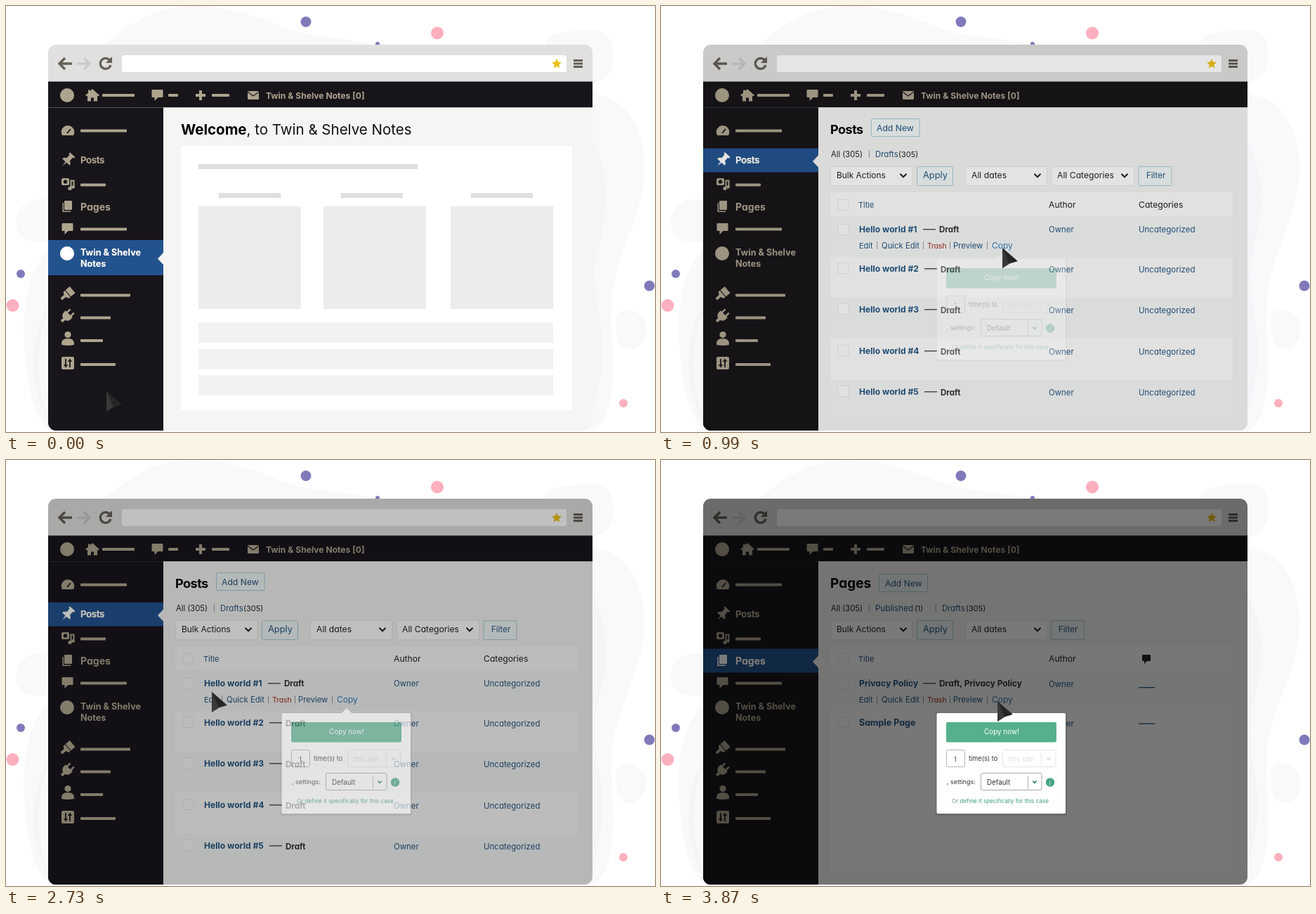
Write an HTML page that moves like this. It is 924 by 606 pixels and loops after 5.08 s.

```html
<!DOCTYPE html>
<html lang="en">
<head>
<meta charset="utf-8">
<title>Copying posts and pages</title>
<style>
  html, body { margin: 0; width: 100%; height: 100%; overflow: hidden; background: #fff; }
  svg { display: block; width: 100vw; height: 100vh; }
  text { font-family: Inter, Lato, sans-serif; font-feature-settings: "cv11"; white-space: pre; }
  #popup text { font-feature-settings: normal; }
</style>
</head>
<body>
<svg id="stage" viewBox="0 0 924 606" xmlns="http://www.w3.org/2000/svg"></svg>
<script>
const LOOP = 5080;
const INK = '#18151a', TAN = '#aea48e', LINK = '#24557f', BLUE = '#23538f', GREEN = '#57b08c';
const PRODUCT = ['Twin & Shelve', 'Notes'], USER = 'Owner';

// Drawing helpers, all return SVG markup
const esc = s => s.replace(/&/g, '&amp;');
const rect = (x, y, w, h, fill, more = '') =>
  `<rect x="${x}" y="${y}" width="${w}" height="${h}" fill="${fill}" ${more}/>`;
const circle = (x, y, r, fill) => `<circle cx="${x}" cy="${y}" r="${r}" fill="${fill}"/>`;
const path = (d, fill, more = '') => `<path d="${d}" fill="${fill}" ${more}/>`;
const stroke = (d, color, w, more = '') =>
  path(d, 'none', `stroke="${color}" stroke-width="${w}" ${more}`);
const text = (x, y, s, size, fill = '#222', weight = 400, space = 0) =>
  `<text x="${x}" y="${y}" font-size="${size}" fill="${fill}" font-weight="${weight}" letter-spacing="${space}">${esc(s)}</text>`;
const bold = (x, y, s, size, fill, space) => text(x, y, s, size, fill, 700, space);
const group = (id, ...parts) => `<g id="${id}">${parts.join('')}</g>`;
const place = (x, y, turn, body) => `<g transform="translate(${x} ${y}) rotate(${turn})">${body}</g>`;
const chevron = (x, y, r = 4.5, color = '#222', w = 2) =>
  stroke(`M${x - r} ${y - r / 2}l${r} ${r}l${r} ${-r}`, color, w);
const bubble = (x, y, fill) =>
  path(`M${x - 7} ${y - 8}h14q1 0 1 1v9q0 1-1 1h-6l-5 5v-5h-3q-1 0-1-1v-9q0-1 1-1z`, fill);

// Sidebar pieces
const pin = c => place(88, 219, 42,
  path('M-5-10h10v2l-2 1v6q4 2 4 5h-14q0-3 4-5v-6l-2-1zM-1 4h2l-1 7z', c));
const sheets = c => rect(83, 277, 11, 13, c, 'rx="1"') + path('M80.500 280h1.500v11.500h10v1.500h-11.500z', c);
const productItem = c => circle(87, 352, 10, c)
  + bold(106, 355, PRODUCT[0], 12.6, c) + bold(106, 371, PRODUCT[1], 12.6, c);
const postsItem = c => pin(c) + bold(106, 224, 'Posts', 13.4, c, -.5);
const pagesItem = c => sheets(c) + bold(106, 290.500, 'Pages', 14, c);

function backdrop() {
  const dots = [[427, 22.5, 7.5, 0], [529, 54, 3, 0], [21, 381, 6, 0], [916, 398, 7.5, 0],
    [614, 38.5, 9, 1], [9.5, 426, 9, 1], [879, 565, 6, 1]];
  return [
    'M120 70C175 25 210 0 268 0C350 0 385 35 440 42C500 48 540 55 560 75z',
    'M62 276C40 270 14 282 14 308C14 334 42 340 62 334z',
    'M62 345C35 370 22 420 26 480C29 540 40 585 62 604z',
    'M768 55C768 38 790 37 815 35C850 30 865 40 865 70C865 95 855 104 834 110z',
    'M834 125C880 130 906 165 909 225C911 300 865 350 862 425C861 470 870 520 860 560C855 585 848 598 834 606z',
    'M868 445C870 428 895 430 905 442C918 456 910 486 890 488C868 488 869 465 868 445z',
  ].map(d => path(d, '#f9f9fb')).join('')
    + stroke('M61 430C38 470 36 540 61 590', '#f5f5f8', 6)
    + path('M834 190C862 240 858 290 842 350C828 410 860 460 846 530C842 555 838 570 834 580z', '#f5f5f8')
    + dots.map(([x, y, r, pink]) => circle(x, y, r, pink ? '#fcb0bd' : '#807abb')).join('');
}

const frame = () => rect(60, 55, 775, 80, '#e0e0de', 'rx="11"')
  + rect(165, 70, 633, 24, '#fff', 'rx="3"') + rect(60, 107.500, 775, 37, INK);

// Page ground with sidebar; the active row spans y to y + h
const ground = (fill, y, h) => rect(60, 144.500, 164, 460, INK) + rect(224, 144.500, 611, 460, fill)
  + rect(60, y, 164, h, BLUE) + path(`M224 ${y + h / 2 - 7}l-8 8.500l8 8.500z`, fill);

const button = (x, y, w, h = 28) =>
  rect(x + .5, y + .5, w - 1, h - 1, '#eff6f6', 'stroke="#a9cbd6" rx="1"');
const select = (x, w) => rect(x + .5, 228.500, w - 1, 27, '#fdfdfd', 'stroke="#e9e9e9"');
const check = y => rect(252, y - 7.500, 15, 15, '#fafafa', 'stroke="#e6e8e8"');

function welcomeBack() {
  const card = [274, 452, 633];
  return ground('#f5f5f3', 333, 50) + rect(249, 199, 557, 376, '#fff')
    + rect(274, 225, 312, 7, '#dfdfdf')
    + [303, 477, 662].map(x => rect(x, 266, 88, 7, '#dfdfdf')).join('')
    + card.map(x => rect(x, 285, 146, 146, '#ececec')).join('')
    + [450, 488, 525].map(y => rect(274, y, 505, 29, '#f2f2f2')).join('');
}

function tableBack(rows) {
  return rect(241, 265, 573, 322, '#fafafa') + check(282.500)
    + rows.map(([y, h], i) => (i % 2 ? '' : rect(241, y, 573, h, '#f3f5f5'))
      + check(i ? y + 16 : y + 19)).join('');
}

const postsBack = () => ground('#f3f3f2', 202.500, 34) + button(299, 160, 69.500, 26)
  + select(241, 117) + button(364, 228, 52) + select(433, 117) + select(556, 118)
  + button(679.500, 228, 48)
  + tableBack([[299, 58], [357, 57], [415, 58], [474, 58], [532, 55]]);

const pagesBack = () => ground('#f3f3f2', 268.500, 34) + button(310, 162, 70, 26)
  + select(241, 117) + button(364, 228, 52) + select(433, 117) + button(555, 228, 48)
  + tableBack([[299, 58], [357, 230]]);

function frameFront() {
  const bars = [[137, 127, 46], [231, 127, 14], [293, 127, 25], [106, 177.500, 66], [106, 254.500, 36],
    [106, 317.500, 66], [106, 411.500, 71], [106, 443.500, 43], [106, 476, 32], [106, 510, 50]];
  const grey = '#655f56';
  return stroke('M94 82H77M84 74l-8 8l8 8', grey, 3.4)
    + stroke('M101 82h17M111 74l8 8l-8 8', '#cbcac7', 3.2)
    + stroke('M147.500 77a7.500 7.500 0 1 0 1.500 7', grey, 3.2) + path('M151 72v9h-9z', grey)
    + path('M784 75l2 4.600l5 .500l-3.700 3.300l1.100 4.900l-4.400-2.500l-4.400 2.500l1.100-4.900l-3.700-3.300l5-.500z', '#ecc218')
    + [76, 80.500, 85].map(y => rect(808, y, 13, 3, grey)).join('')
    + circle(87, 127, 10, TAN)
    + path('M123 118l10 9l-1.500 1.500l-1.500-1v8h-5v-5h-4v5h-5v-8l-1.500 1l-1.500-1.500l4-3.600v-4h3v1.500z', TAN)
    + bubble(215.500, 127, TAN) + stroke('M270 127h14M277 120v14', TAN, 4)
    + rect(344, 121, 16, 12, TAN, 'rx="1.500"') + stroke('M344.500 122.500l7.500 5.500l7.500-5.500', INK, 1.2)
    + bold(370, 132, PRODUCT.join(' ') + ' [0]', 12.1, TAN)
    + bars.map(([x, y, w]) => rect(x, y - 2, w, 4, TAN, 'rx="1"')).join('')
    + path('M80 184a9.300 9.300 0 1 1 16 0z', TAN) + stroke('M87 181l5-6', INK, 1.8)
    + rect(79, 245, 11, 10, TAN, 'rx="2"') + circle(84.500, 250, 2.700, INK)
    + stroke('M92.500 259v-10.500h4v9.500', TAN, 2) + circle(91, 259.500, 2.600, TAN) + circle(95.500, 257.500, 2.300, TAN)
    + bubble(87.500, 317, TAN)
    + place(87, 410, 50, path('M-6-10h12v8h-12zM-6-1h12v3l-4 2v6q-2 2-4 0v-6l-4-2z', TAN))
    + place(87, 441, 45, path('M-5-10h2.500v6h5v-6h2.500v6h2v3q0 6-5 7v5h-4v-5q-5-1-5-7v-3h2z', TAN))
    + circle(88, 467.500, 4.600, TAN) + path('M79 482q-1-9 9-9t9 9q-9 2-18 0z', TAN)
    + rect(79, 499, 18, 18, TAN, 'rx="2"')
    + stroke('M85 502v12M91 502v12M82.500 511h5M88.500 505h5', INK, 1.8)
    + productItem(TAN) + postsItem(TAN) + pagesItem(TAN);
}

const welcomeFront = () => productItem('#fff')
  + `<text x="249" y="183" font-size="20.500" fill="#111"><tspan font-weight="700" fill="#000">Welcome</tspan>, to ${esc(PRODUCT.join(' '))}</text>`;

const bar = (x, y) => rect(x, y, 1, 11, '#9a9a9a');
const filters = () => text(242, 214.500, 'All (305)', 11.2) + bar(296, 205)
  + text(250, 245, 'Bulk Actions', 11.9) + chevron(345, 241) + text(373, 245, 'Apply', 12.800, LINK)
  + text(442, 245, 'All dates', 12.200) + chevron(536, 241)
  + text(281, 287, 'Title', 11, LINK) + text(552, 287, 'Author', 12.200);
const actions = () => [[282, 'Edit', 11], [314, 'Quick Edit', 11.300], [416, 'Preview', 11.300]]
  .map(([x, s, size]) => text(x, 345, s, size, LINK)).join('')
  + text(379, 345, 'Trash', 10.300, '#a3260d') + text(471, 345, 'Copy', 12, '#3a7db4')
  + [307, 373, 411, 464].map(x => bar(x, 335)).join('');
const dash = (x, y) => rect(x, y, 18, 1.500, '#555');

function postsFront() {
  const rows = [322, 378, 436, 495, 553].map((y, i) => {
    const shift = i ? 1 : 0;
    return bold(282, y, 'Hello world #' + (i + 1), 12.100, LINK) + dash(373 + 2 * shift, y - 5)
      + bold(396 + 2 * shift, y + shift, 'Draft', 11.600, '#333')
      + text(552, y + shift, USER, 11.400, LINK)
      + text(680, y + shift, 'Uncategorized', 11.500, LINK);
  });
  return postsItem('#fff') + bold(241, 182, 'Posts', 18, '#000', -.5)
    + text(307, 177.500, 'Add New', 12.200, LINK)
    + filters() + text(305, 214.500, 'Drafts', 11.400, LINK) + text(338, 214.500, '(305)', 11)
    + text(564, 245, 'All Categories', 12.200) + chevron(660, 241) + text(691, 245, 'Filter', 11.500, LINK)
    + text(680, 287, 'Categories', 12.200) + rows.join('') + actions();
}

const pagesFront = () => pagesItem('#fff') + bold(241, 182, 'Pages', 19, '#000')
  + text(319, 179.500, 'Add New', 12.200, LINK) + filters()
  + text(305, 214.500, 'Published', 11.700, LINK) + text(361, 214.500, '(1)', 10.600) + bar(391, 205)
  + text(400, 214.500, 'Drafts', 11.400, LINK) + text(434, 214.500, '(305)', 11)
  + text(566, 245, 'Filter', 11.500, LINK)
  + path('M686 277h10q1 0 1 1v7q0 1-1 1h-4l-4 4v-4h-2q-1 0-1-1v-7q0-1 1-1z', '#222')
  + bold(282, 322, 'Privacy Policy', 12.200, LINK) + dash(373, 317)
  + bold(396, 322, 'Draft, Privacy Policy', 11.900, '#333')
  + bold(282, 378, 'Sample Page', 12.500, LINK)
  + text(552, 323, USER, 11.400, LINK) + text(552, 379, USER, 11.400, LINK)
  + rect(680, 323, 23, 1.300, LINK) + rect(680, 374.500, 23, 1.300, LINK) + actions();

const field = (x, y, w, edge) => rect(x + .5, y + .5, w - 1, 24, '#fff', `stroke="${edge}" rx="2"`);
const popup = () => rect(391, 359, 187, 147, '#000', 'opacity=".1" rx="3"')
  + rect(392.500, 360, 183.500, 143, '#fff', 'rx="2"') + path('M477 361l8-8l8 8z', '#fff')
  + rect(406, 373, 157, 28.500, GREEN, 'rx="2"') + text(460, 390, 'Copy now!', 9.900, '#fff')
  + field(406, 412, 27, '#b4b4b4') + text(417, 428.500, '1', 9.500, '#444')
  + text(438, 428, 'time(s) to', 9.200, '#333')
  + field(486, 412, 76.500, '#e4e4e4') + text(495, 428.500, 'this site', 9.600, '#dcdcdc')
  + rect(541, 416, 1, 18, '#e6e6e6') + chevron(551.500, 425, 2.700, '#ccc', 1.300)
  + text(407, 461, ', settings:', 8.900, '#333')
  + field(455, 445, 87.500, '#a9a9a9') + text(464, 461.500, 'Default', 9.800, '#333')
  + rect(522, 449, 1, 19, '#b5b5b5') + chevron(532, 458, 2.700, '#2e7d5f', 1.500)
  + circle(554, 458.500, 6.200, '#45a583') + `<text x="552.800" y="461.500" font-size="8" font-style="italic" fill="#fff">i</text>`
  + `<text x="414" y="488" font-size="8.150" fill="#3c9c79"><tspan fill="#6f9c8b">Or</tspan> define it specifically for this case</text>`;

const stage = document.getElementById('stage');
stage.innerHTML = `<defs><clipPath id="win">${rect(60, 55, 775, 549, '#000', 'rx="11"')}</clipPath></defs>`
  + backdrop()
  + `<g clip-path="url(#win)">`
  + frame() + welcomeBack() + group('postsBack', postsBack()) + group('pagesBack', pagesBack())
  + frameFront()
  + group('welcomeFront', welcomeFront()) + group('postsFront', postsFront()) + group('pagesFront', pagesFront())
  + rect(60, 55, 775, 549, '#000', 'id="dim"') + '</g>'
  + group('popup', popup())
  + group('cursor', path('M0 0L22 19L10 22.500L0 29z', '#272626'), path('M0 0L10 22.500L0 29z', '#3a3939'));

// Steps are [ms, value]; the last value holds to the end of the loop
function play(id, steps, toStyle, easing = 'linear') {
  const all = [...steps, [LOOP, steps[steps.length - 1][1]]];
  const keys = all.map(([ms, v]) => ({ offset: ms / LOOP, easing, ...toStyle(v) }));
  document.getElementById(id).animate(keys, { duration: LOOP, iterations: Infinity });
}
const fade = (id, steps) => play(id, steps, opacity => ({ opacity }));

// A click at ms starts a page change, then the popup opens
const rise = (ms, top, curve) => curve.map(([d, v]) => [ms + d, v * top]);
const dimCurve = [[330, 0], [360, .08], [420, .24], [540, .9], [660, .97], [780, 1]];
const popCurve = [[340, 0], [360, .03], [420, .25], [540, .32], [660, .8], [780, 1]];
const POSTS = 570, PAGES = 3090, SWAP = 150;

fade('postsBack', [[0, 0], [POSTS, 0], [POSTS + SWAP, 1]]);
fade('pagesBack', [[0, 0], [PAGES, 0], [PAGES + SWAP, 1]]);
fade('welcomeFront', [[0, 1], [POSTS, 1], [POSTS + SWAP, 0]]);
fade('postsFront', [[0, 0], [POSTS, 0], [POSTS + SWAP, 1], [PAGES, 1], [PAGES + SWAP, 0]]);
fade('pagesFront', [[0, 0], [PAGES, 0], [PAGES + SWAP, 1]]);
fade('dim', [[0, 0], ...rise(POSTS, .41, dimCurve), [2580, .41], [2730, .25], [2940, 0], ...rise(PAGES, .52, dimCurve)]);
fade('popup', [[0, 0], ...rise(POSTS, 1, popCurve), [2580, 1], [2730, .62], [2940, 0], ...rise(PAGES, 1, popCurve)]);
play('cursor', [
  [0, [143, 548]], [30, [143, 548]], [360, [150, 222]], [POSTS, [150, 222]], [900, [486, 344]],
  [1710, [486, 344]], [1950, [481, 386]], [2520, [481, 386]], [2910, [150, 287]],
  [PAGES, [150, 287]], [3480, [479, 343]],
], ([x, y]) => ({ transform: `translate(${x}px, ${y}px)` }), 'cubic-bezier(.4, 0, .6, 1)');
</script>
</body>
</html>
```
